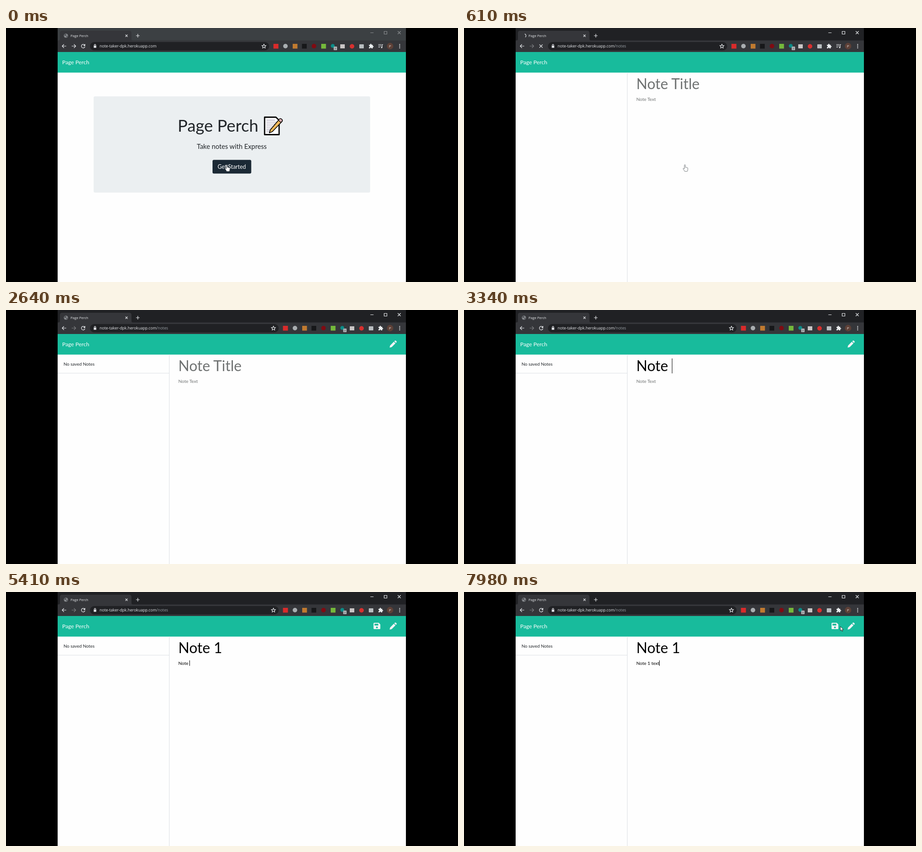
An HTML page that plays this animation: 998x561 px, repeating every 8000 ms.

```html
<!DOCTYPE html>
<html lang="en">
<head>
<meta charset="utf-8">
<title>Page Perch</title>
<style>
html, body { margin: 0; width: 100%; height: 100%; overflow: hidden; background: #000; }
svg { display: block; width: 100%; height: 100%; }
text { font-family: Lato, sans-serif; white-space: pre; }
.ui text { font-family: "Open Sans", "Noto Sans", sans-serif; }
.line { fill: none; stroke: #e8eaed; stroke-width: 1.2; }
</style>
</head>
<body>
<svg viewBox="0 0 998 561">
  <rect width="998" height="561"/>
  <rect x="114" width="769" height="561" fill="#fefefe"/>

  <g class="ui">
    <rect id="frame" x="114" width="769" height="28"/>
    <path d="M115 28q4 0 4-4V11q0-5 5-5h148q5 0 5 5v13q0 4 4 4z" fill="#35363a"/>
    <rect x="114" y="27.5" width="769" height="25.5" fill="#35363a"/>
    <g id="globe">
      <circle cx="132.3" cy="17" r="4.6" fill="#85888c"/>
      <path d="M129 14.5q3-2 4 0t-2 2.5-2 1zM133 18l3-1q0 3-3 3.500z" fill="#4b4d51"/>
    </g>
    <path id="spinner" class="line" d="M0-4A4 4 0 0 1 3 2.600" stroke-width="1.3"/>
    <text x="142.500" y="19.700" font-size="7.600" fill="#e8eaed">Page Perch</text>
    <path class="line" d="M263.700 14.700l4.800 4.800m0-4.800l-4.800 4.800M287 17h8m-4-4v8"/>
    <path id="controls" class="line" d="M804.500 10.500h7M835 7.500h6v6h-6zM865 7l6.500 6.500m0-6.500l-6.500 6.500" stroke-width="1"/>

    <path class="line" d="M133 40h-9m4-4l-4 4 4 4" stroke-width="1.4"/>
    <path id="forward" class="line" d="M145 40h9m-4-4l4 4-4 4" stroke-width="1.4"/>
    <g id="reload">
      <path class="line" d="M173.200 37.200A4 4 0 1 0 174.300 41" stroke-width="1.400"/>
      <path d="M175 35v4.600h-4.600z" fill="#e8eaed"/>
    </g>
    <path id="stop" class="line" d="M166.500 36.500l7 7m0-7l-7 7" stroke-width="1.400"/>

    <rect id="omnibox" x="185.500" y="31" height="18.500" rx="9.250" fill="#202124"/>
    <rect x="193.700" y="39" width="5.600" height="4.800" rx=".6" fill="#dfe1e5"/>
    <path class="line" d="M194.900 39v-1.200a1.600 1.600 0 0 1 3.200 0V39" stroke-width="1"/>
    <text x="206.800" y="43.300" font-size="8.650" fill="#e8eaed">note-taker-dpk.herokuapp.com<tspan id="path" fill="#9aa0a6">/notes</tspan></text>

    <g id="tools">
      <path class="line" d="M569.500 35.800l1.300 2.900 3.200.300-2.400 2.100.700 3.100-2.800-1.600-2.800 1.600.700-3.100-2.400-2.100 3.200-.300z" stroke-width=".9"/>
      <rect x="590.500" y="35" width="11" height="10.500" fill="#d92b2b"/>
      <circle cx="617" cy="40" r="5" fill="#a9adb0"/>
      <rect x="633" y="35" width="10.500" height="10.500" fill="#c07a30"/>
      <rect x="653.500" y="35" width="10.500" height="10.500" fill="#17181a"/>
      <circle cx="680" cy="40" r="5" fill="#800b12"/>
      <rect x="696" y="35" width="10.500" height="10.500" fill="#74b83b"/>
      <circle cx="721.500" cy="39.500" r="4.300" fill="#0d8c88"/>
      <rect x="723.500" y="41" width="7.500" height="8" rx="1" fill="#aeb2b5"/>
      <text x="727.200" y="47.600" font-size="6" text-anchor="middle" fill="#333">7</text>
      <rect x="738" y="36" width="10" height="9" fill="#c9c5c5"/>
      <circle cx="764" cy="40.500" r="5" fill="#d8302f"/>
      <rect x="780" y="36" width="10" height="9" rx="1" fill="#b9bdc0"/>
      <path d="M801.500 37h2.700q-.5-2.200 1.300-2.200t1.300 2.200h2.900v2.700q2-.3 2 1.300t-2 1.300V45h-2.900q.2-1.800-1.300-1.800t-1.300 1.800h-2.700v-2.800q1.700 0 1.700-1.300t-1.700-1.300z" fill="#eceef0"/>
    </g>
    <g id="playlist">
      <path class="line" d="M822 36.500h7M822 39.500h7M822 42.500h4M830.500 43v-6.500h2" stroke-width="1"/>
      <circle cx="829.500" cy="43" r="1.500" fill="#e8eaed"/>
    </g>
    <circle cx="848" cy="40" r="7.200" fill="#5d4037"/>
    <text x="848" y="43" font-size="8" text-anchor="middle" fill="#e8ddd9">P</text>
    <path d="M868.200 35.500h2v2h-2zm0 3.600h2v2h-2zm0 3.600h2v2h-2z" fill="#e8eaed"/>
  </g>

  <rect x="114" y="53" width="769" height="45.500" fill="#18bb9c"/>
  <text x="124" y="79.800" font-size="12.300" fill="#fff">Page Perch</text>

  <g id="home" fill="#212529">
    <rect x="193.500" y="151" width="610.500" height="212.500" rx="3" fill="#ebeff1"/>
    <text x="379" y="229" font-size="36.700">Page Perch</text>
    <g stroke="#000" stroke-linejoin="round">
      <path d="M571 197h25l7 7v31.500h-32z" fill="#fff" stroke-width="2.800"/>
      <path d="M575 203.500h19m-19 4.300h23m-23 4.300h21m-21 4.300h17m-17 4.300h13m-13 4.300h10m-10 4.300h8" stroke="#aaa4b8" stroke-width="1.300"/>
      <path d="M581.500 231.500l2-6.500 20-23.500q2-2.500 5 0t1 5l-21.500 22.500z" fill="#f3b95b" stroke-width="1.700"/>
      <path d="M601.500 203.800l5.500 5 2.500-3q1.800-2.300-1-4.500t-5 0z" fill="#d8adb0" stroke-width="1.200"/>
    </g>
    <text x="498.500" y="266.500" font-size="14.750" text-anchor="middle">Take notes with Express</text>
    <rect x="456" y="291.300" width="85.500" height="30.300" rx="3" fill="#1b2935"/>
    <text x="498.500" y="310.900" font-size="12.400" text-anchor="middle" fill="#fff">Get Started</text>
  </g>

  <g id="notes">
    <rect x="360" y="98.500" width="1" height="463" fill="#dcdfe4"/>
    <g id="list">
      <text x="127" y="122.600" font-size="9.850" fill="#212529">No saved Notes</text>
      <rect x="114" y="139" width="246" height="1" fill="#dcdfe4"/>
    </g>
    <text id="title" x="380.500" y="135" font-size="32"></text>
    <text id="body" x="380.500" y="160.700" font-size="10.100"></text>
    <rect id="caret" width="1"/>
    <path id="pencil" d="M847 83l1-4.600 8.300-8.300 3.600 3.600-8.300 8.300zM857.300 69.100l1.400-1.400q1-1 2 0l1.600 1.600q1 1 0 2l-1.400 1.400z" fill="#f0f4f5"/>
    <path id="save" fill-rule="evenodd" d="M813 68h10l3.500 3.500v9q0 1.500-1.500 1.500h-12q-1.500 0-1.500-1.500v-11q0-1.500 1.500-1.500zM813.700 70v4h8.300v-4zM819 76.200a2 2 0 1 0 .01 0z" fill="#f0f4f5"/>
  </g>

  <path id="hand" d="M-1.500 1.200a1.200 1.200 0 0 1 2.400 0V6q1.300-1 2 .2 1.200-.8 1.700.4 1.500-.4 1.500 1V11q0 2-1.200 3.700H-.700Q-2 12-4 9.500q-.7-1.400.5-1.500t2 1.200z" fill="#fff" stroke="#555b60" stroke-width=".8"/>
  <path id="beam" d="M-2-6h1.500L0-5.500.5-6H2M0-5.500v11M-2 6h1.500L0 5.500.5 6H2" fill="none" stroke="#333" stroke-width=".8"/>
  <path id="arrow" d="M0 0V9.500L2.200 7.500 3.800 11 5.300 10.400 3.800 7H6.700z" fill="#fff" stroke="#111" stroke-width=".8"/>
</svg>
<script>
const el = id => document.getElementById(id);
const show = (id, on) => el(id).setAttribute("visibility", on ? "inherit" : "hidden");
const set = (id, attrs) => { for (const k in attrs) el(id).setAttribute(k, attrs[k]); };
const within = (t, spans) => spans.some(([a, b]) => t >= a && t < b);

const titleKeys = [2820, 2990, 3080, 3160, 3340, 4060];
const bodyKeys = [4860, 4950, 5030, 5120, 5210, 5610, 5790, 6090, 6190, 6440, 6640];
const caretOn = [[2090, 2640], [2820, 3870], [4060, 7180], [7700, 8000]];
const handPath = [[1010, 488, 302], [1330, 428, 197], [1650, 373, 121], [1810, 388, 121]];
const arrowPath = [[7107, 420, 120], [7500, 610, 104], [7840, 815, 80], [7980, 831, 76]];

const typed = (text, keys, t) => text.slice(0, keys.filter(k => k <= t).length);
const steps = (t, start, size) => start + Math.floor((t - start + .01) / size) * size;

// Linear position along [time, x, y] points, held at both ends
function along(points, t) {
  const i = points.findIndex(p => p[0] > t);
  if (i === 0) return points[0].slice(1);
  if (i < 0) return points[points.length - 1].slice(1);
  const [a, b] = [points[i - 1], points[i]];
  const k = (t - a[0]) / (b[0] - a[0]);
  return [a[1] + (b[1] - a[1]) * k, a[2] + (b[2] - a[2]) * k];
}

function field(id, text, hint) {
  el(id).textContent = text || hint;
  el(id).setAttribute("fill", text ? "#000" : "#6f7272");
  return Math.round(380.5 + (text ? el(id).getComputedTextLength() : 0));
}

function drawBrowser(t) {
  const focused = t >= 120, loading = within(t, [[250, 900]]), moved = t >= 540;
  set("frame", { fill: focused ? "#202124" : "#3c4043" });
  set("controls", { opacity: focused ? 1 : .45 });
  show("globe", !loading);
  show("spinner", loading);
  set("spinner", { transform: `translate(133 17) rotate(${(t - 570) * .36})` });
  show("reload", !loading);
  show("stop", loading);
  set("forward", { opacity: moved ? .4 : 1 });
  show("path", moved);
  const shift = t >= 2410 ? 21 : 0;
  set("omnibox", { width: 395.5 + shift });
  set("tools", { transform: `translate(${shift})` });
  show("playlist", !shift);
}

function drawPage(t) {
  show("home", t < 610);
  show("notes", t >= 610);
  show("list", t >= 900);
  show("pencil", t >= 780);
  show("save", t >= bodyKeys[0]);
  const titleEnd = field("title", typed("Note 1", titleKeys, t), "Note Title");
  const bodyEnd = field("body", typed("Note 1 text", bodyKeys, t), "Note Text");
  show("caret", within(t, caretOn));
  set("caret", t < 4370
    ? { x: titleEnd, y: 107, height: 33 }
    : { x: bodyEnd, y: 151, height: 12 });
}

function drawPointer(t) {
  const late = t >= 7180;
  const [x, y] = late ? along(arrowPath, steps(t, 7107, 873 / 12))
                      : along(handPath, steps(t, 1010, 80));
  const shape = late ? (y > 98 ? "beam" : "arrow")
    : t < 1810 ? "hand" : t < 2410 ? "beam" : "";
  for (const id of ["hand", "beam", "arrow"]) {
    show(id, id === shape);
    set(id, { transform: `translate(${x} ${y})` });
  }
}

function draw() {
  const t = performance.now() % 8000;
  drawBrowser(t);
  drawPage(t);
  drawPointer(t);
  requestAnimationFrame(draw);
}
draw();
</script>
</body>
</html>
```
